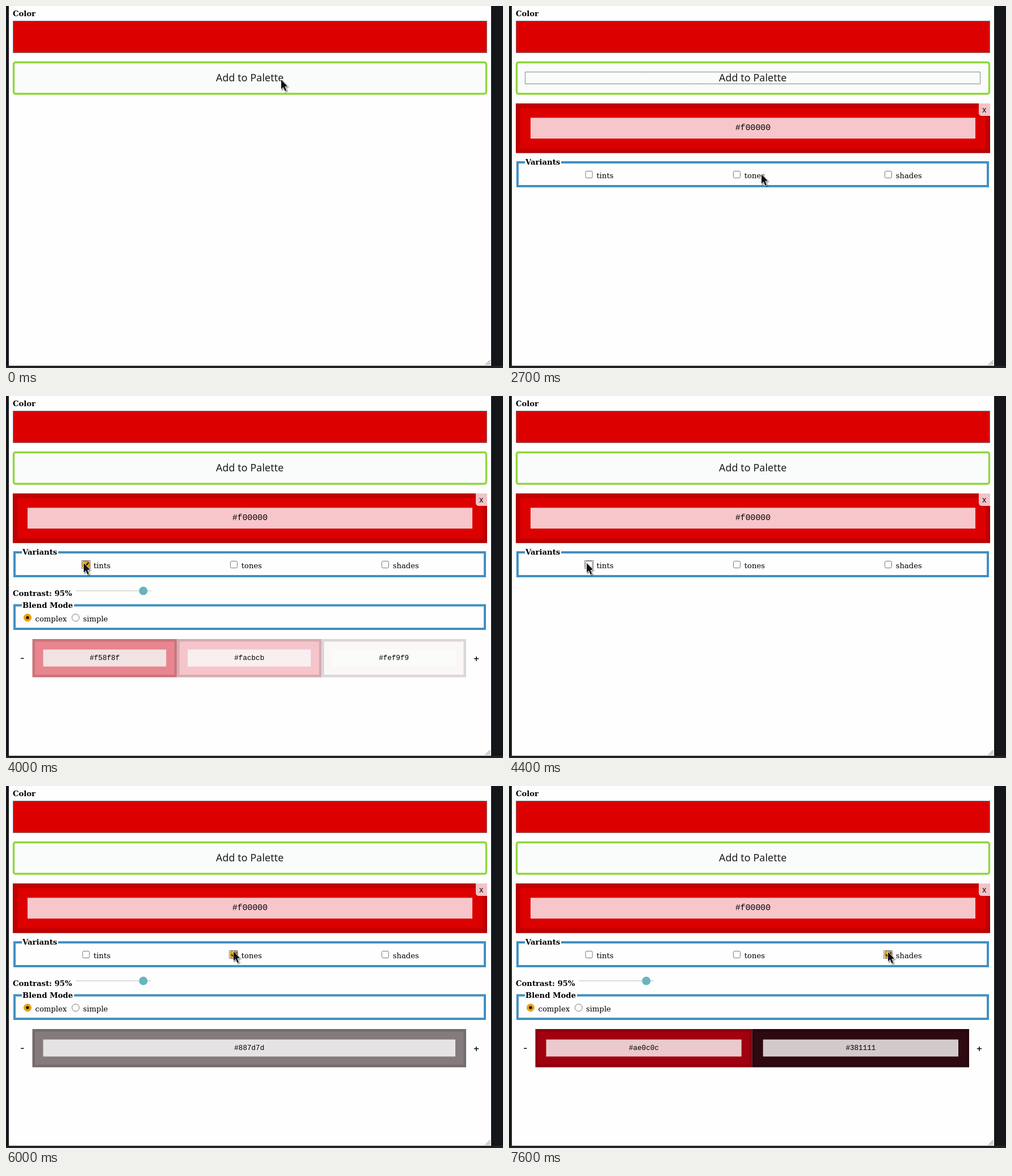
An HTML page with a canvas that plays this animation: 876x639 px, repeating every 8000 ms.

```html
<!DOCTYPE html>
<html lang="en">
<meta charset="utf-8">
<title>Palette builder</title>
<style>
  html, body { margin: 0; width: 100%; height: 100%; overflow: hidden; background: #14171a; }
  canvas { display: block; }
</style>
<canvas id="stage" width="876" height="639"></canvas>
<script>
const ctx = document.getElementById('stage').getContext('2d');
const LOOP = 8000;
const SERIF = "13.2px 'DejaVu Serif', serif";
const BOLD = 'bold ' + SERIF;
const SANS = "'Noto Sans', sans-serif";
const mono = size => `${size}px 'Liberation Mono', monospace`;

// Pointer positions: time, x, y; each holds until the next.
const pointerSteps = [
  [0, 485, 130], [2000, 502, 152], [2100, 545, 207], [2200, 561, 229],
  [2400, 555, 272], [2500, 544, 299], [2700, 445, 297], [2800, 301, 298],
  [3000, 180, 298], [3100, 88, 297], [3200, 137, 295],
  [4900, 290, 323], [5000, 408, 320], [5200, 404, 302], [5300, 401, 292],
  [6700, 537, 310], [6800, 597, 305], [6900, 642, 299], [7000, 662, 296], [7100, 668, 293]
];

const options = [
  { name: 'tints', x: 141, focus: [4000, 6000], checked: [4000, 4400], colors: [
    ['#f58f8f', '#e8858e', '#f2e3e3'], ['#facbcb', '#f5c5cb', '#f9eff1'], ['#fef9f9', '#fbf7f6', '#fafcf9']] },
  { name: 'tones', x: 401.5, focus: [6000, 7600], checked: [6000, 6700], colors: [
    ['#887d7d', '#857b7c', '#e6e3e4']] },
  { name: 'shades', x: 668.5, focus: [7600, LOOP], checked: [7600, LOOP], colors: [
    ['#ae0c0c', '#a0000f', '#ecc9cc'], ['#381111', '#2e0912', '#d3cbcb']] }
];

const during = (t, [from, to]) => t >= from && t < to;

function rect(x, y, w, h, color) {
  ctx.fillStyle = color;
  ctx.fillRect(x, y, w, h);
}

function text(str, x, y, font, color = '#000', align = 'left') {
  ctx.font = font;
  ctx.fillStyle = color;
  ctx.textAlign = align;
  ctx.fillText(str, x, y);
}

function shape(build, fill, stroke, width = 1) {
  ctx.beginPath();
  build();
  if (fill) { ctx.fillStyle = fill; ctx.fill(); }
  if (stroke) { ctx.strokeStyle = stroke; ctx.lineWidth = width; ctx.stroke(); }
}

const rounded = (x, y, w, h, r, ...paint) => shape(() => ctx.roundRect(x, y, w, h, r), ...paint);
const circle = (x, y, r, ...paint) => shape(() => ctx.arc(x, y, r, 0, 7), ...paint);

function dotted(x, y, w, h) {
  ctx.setLineDash([1, 1]);
  rounded(x, y, w, h, 0, null, '#111');
  ctx.setLineDash([]);
}

function fieldset(title, y, h, gap) {
  rounded(15, y + 2, 829, h - 4, 0, null, '#4190c0', 4);
  rect(28, y - 1, gap, 6, '#fefefe');
  text(title, 29, y + 6, BOLD);
}

function swatch(x, y, w, h, border, color) {
  rect(x, y, w, h, color);
  rounded(x + border / 2, y + border / 2, w - border, h - border, 0, null, 'rgba(0,0,0,.13)', border);
}

function drawBase() {
  rect(0, 0, 876, 639, '#14171a');
  rect(0, 635, 876, 4, '#222426');
  rect(5, 0, 850, 635, '#fefefe');
  for (const d of [3, 6, 9]) {
    shape(() => { ctx.moveTo(853.5 - d, 634); ctx.lineTo(853.5, 634 - d); }, null, '#777');
  }
  text('Color', 12, 18, BOLD);
  rounded(12.5, 26.5, 835, 56, 0, '#dc0000', '#777');
  rounded(13.5, 99.5, 833, 55.5, 3, '#fafcfb', '#90d63c', 3.4);
  text('Add to Palette', 429.7, 133, '18px ' + SANS, '#1d1d1d', 'center');
}

function drawCard() {
  swatch(12, 172, 836, 87.5, 8, '#dc0000');
  rounded(12.5, 172.5, 835, 86.5, 0, null, 'rgba(90,0,0,.35)');
  rect(38, 197.3, 784, 36.7, '#f7c6cb');
  text('#f00000', 430, 219, mono(14.8), '#000', 'center');
  rounded(828, 172, 20, 22, [0, 0, 0, 5], '#f2c3c8');
  text('x', 837.8, 187.5, '14px ' + SANS, '#111', 'center');
}

function drawOption(option, t) {
  const { x, name } = option, y = 297.5;
  const checked = during(t, option.checked);
  rounded(x - 6, y - 6, 12, 12, 2, checked ? '#f0a30a' : '#fff', checked ? '#a87310' : '#777');
  if (checked) {
    shape(() => { ctx.moveTo(x - 4, y); ctx.lineTo(x - 1, y + 3); ctx.lineTo(x + 4.5, y - 3.5); }, null, '#111', 2.2);
  }
  if (during(t, option.focus)) dotted(Math.floor(x) - 7.5, 290.5, 15, 14);
  text(name, x + 13.2, 304, SERIF);
}

function drawVariants(colors) {
  text('Contrast: 95%', 12, 353, BOLD);
  rect(123, 343, 132.5, 1.6, '#d3d6d8');
  circle(242, 344, 7.5, '#68b5ba');

  fieldset('Blend Mode', 367.5, 45.5, 92);
  circle(38, 391.3, 6.7, '#f0a30a', '#d8940f', 0.6);
  circle(38, 391.3, 2.7, '#111');
  text('complex', 51.5, 398, SERIF);
  circle(122.7, 391.3, 6.4, '#fff', '#777');
  text('simple', 135.7, 398, SERIF);

  text('–', 28.7, 467, BOLD, '#000', 'center');
  text('+', 829, 467.5, BOLD, '#000', 'center');
  const width = 764.5 / colors.length;
  colors.forEach(([code, color, label], i) => {
    const x = 46.5 + i * width;
    swatch(x, 429, width, 67.5, 4.5, color);
    rect(x + 19, 447.5, width - 38, 30, label);
    text(code, x + width / 2, 466, mono(12.6), '#000', 'center');
  });
}

function drawPointer(t) {
  const [, x, y] = pointerSteps.findLast(step => t >= step[0]);
  const arrow = [[0, 0], [0, 16.5], [3.8, 13.2], [6.6, 20], [9.2, 18.9], [6.5, 12.3], [11, 11.6]];
  const path = () => {
    arrow.forEach(([px, py]) => ctx.lineTo(x + px, y + py));
    ctx.closePath();
  };
  ctx.save();
  ctx.shadowColor = 'rgba(0,0,0,.4)';
  ctx.shadowBlur = 2;
  ctx.shadowOffsetX = ctx.shadowOffsetY = 1.5;
  shape(path, '#fff', '#fff', 1.6);
  ctx.restore();
  shape(path, '#111');
}

function draw(now) {
  const t = now % LOOP;
  drawBase();
  if (t >= 1400) {
    if (t < 4000) dotted(28.5, 116.5, 802, 21);
    drawCard();
    fieldset('Variants', 274, 46, 64);
    options.forEach(option => drawOption(option, t));
    const active = options.find(option => during(t, option.checked));
    if (active) drawVariants(active.colors);
  }
  drawPointer(t);
  requestAnimationFrame(() => draw(performance.now()));
}

draw(0);
</script>
</html>
```
